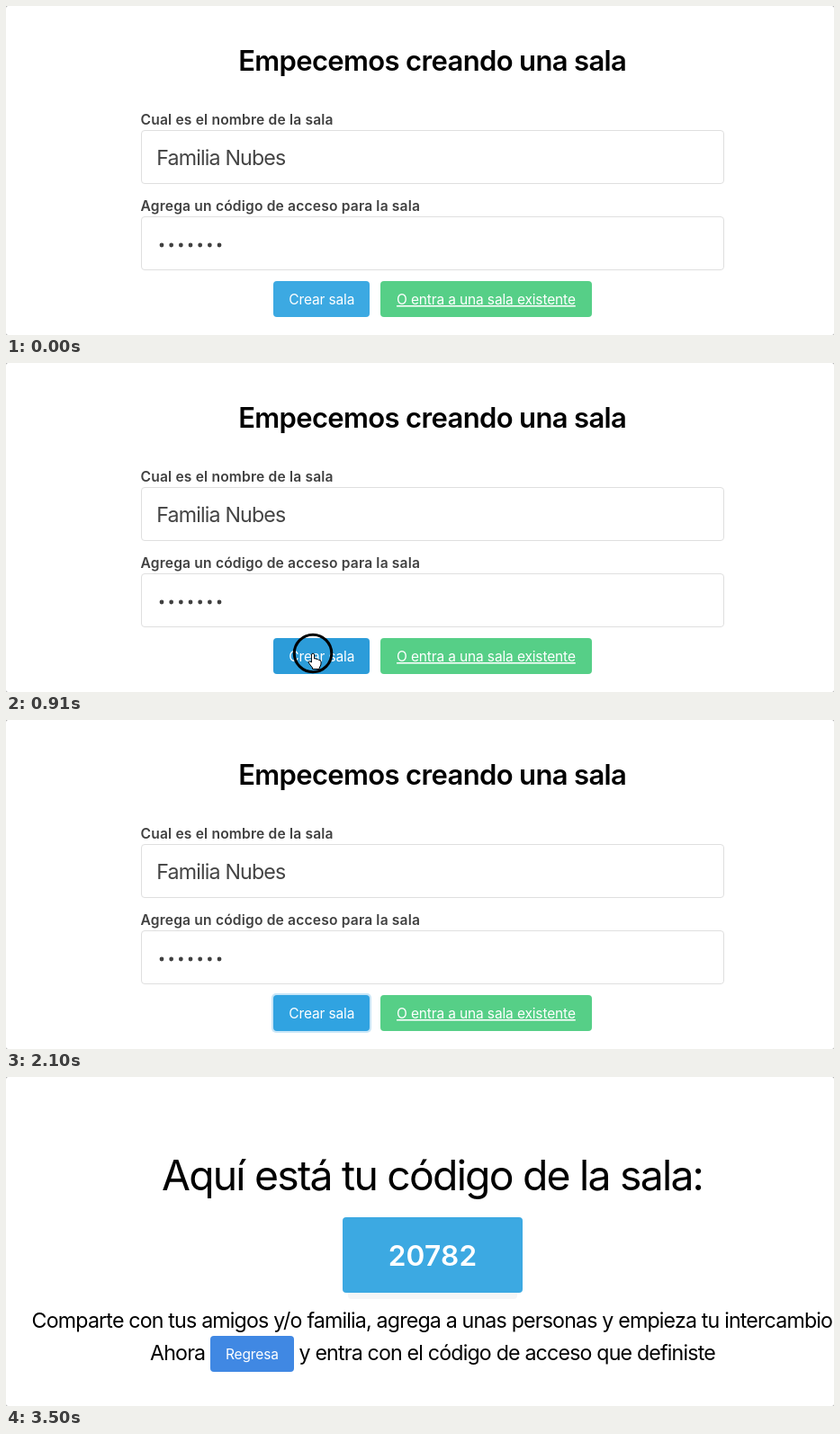
Write an HTML page that moves like this. It is 920 px wide and 366 px high and loops after 3.57 s.

```html
<!DOCTYPE html>
<html lang="es">
<head>
<meta charset="utf-8">
<style>
  html, body { margin: 0; width: 100%; height: 100%; overflow: hidden; background: #fff; }
  svg { display: block; width: 920px; height: 366px; font-family: Inter, "Open Sans", sans-serif; }
  .mid { text-anchor: middle; }
  .heading { font-size: 31px; font-weight: 600; letter-spacing: -.0207em; }
  .label { font-size: 15.6px; font-weight: 600; letter-spacing: .0115em; fill: #404040; }
  .value { font-size: 23.2px; letter-spacing: -.0355em; fill: #444; }
  .button { font-size: 15.5px; letter-spacing: -.009em; fill: #fff; }
  .title { font-size: 46.3px; letter-spacing: -.038em; }
  .code { font-size: 31.6px; font-weight: 600; letter-spacing: .006em; fill: #fff; }
  .body { font-size: 23.2px; letter-spacing: -.0355em; }
  .field { fill: #fff; stroke: #dfdfdf; }
</style>
</head>
<body>
<svg viewBox="0 0 920 366">
  <rect width="920" height="366" fill="#aaa"/>
  <rect width="920" height="366" rx="2.5" fill="#fff"/>

  <g id="form">
    <text class="heading mid" x="473.7" y="72">Empecemos creando una sala</text>
    <text class="label" x="149.5" y="132">Cual es el nombre de la sala</text>
    <rect class="field" x="150.5" y="138.5" width="647" height="59" rx="3.5"/>
    <text class="value" x="167.2" y="177">Familia Nubes</text>
    <text class="label" x="149.5" y="228">Agrega un código de acceso para la sala</text>
    <rect id="halo" x="147" y="231" width="654" height="66" rx="6" fill="#d0dff5"/>
    <rect id="password" class="field" x="150.5" y="234.5" width="647" height="59" rx="3.5"/>
    <g id="dots" fill="#404040"></g>
    <path id="caret" d="M242.5 251V278" stroke="#222"/>
    <rect id="glow" x="295" y="304" width="111" height="44" rx="5" fill="#c9e6f7"/>
    <rect id="create" x="297" y="306" width="107" height="40" rx="4"/>
    <text class="button mid" x="350.8" y="332">Crear sala</text>
    <rect x="416" y="306" width="235" height="40" rx="4" fill="#56cf87"/>
    <text class="button mid" x="533.4" y="332" text-decoration="underline">O entra a una sala existente</text>
    <circle id="ring" fill="none" stroke="#000" stroke-width="3"/>
    <path id="arrow" d="M0 0V14.5L3.4 11.4L5.8 16.5L8.4 15.3L6.1 10.4H10.5Z" fill="#000" stroke="#fff"/>
    <path id="hand" d="M-1.6 1Q0-1 1.6 1V6Q3.2 5 4.2 6.7Q5.8 6 6.6 7.6Q9 7 9 9.5V12Q8.6 14 7.2 16V17.5H-.5V16Q-3 13-5 10Q-4.5 7.6-1.6 10Z" fill="#fff" stroke="#000" stroke-linejoin="round"/>
  </g>

  <g id="result">
    <text class="title mid" x="473.6" y="126">Aquí está tu código de la sala:</text>
    <rect x="380" y="236" width="188" height="11" rx="4" fill="#f5f6f7"/>
    <rect x="374" y="156" width="200" height="84" rx="4" fill="#3ca9e2"/>
    <text class="code mid" x="474" y="210">20782</text>
    <text class="body mid" x="473.4" y="279">Comparte con tus amigos y/o familia, agrega a unas personas y empieza tu intercambio</text>
    <text class="body" x="160" y="315">Ahora</text>
    <rect x="227" y="288" width="93" height="40" rx="4" fill="#4088e3"/>
    <text class="button mid" x="273.4" y="314">Regresa</text>
    <text class="body" x="325.5" y="315">y entra con el código de acceso que definiste</text>
  </g>
</svg>
<script>
const LOOP = 3570, STEP = 70;
const $ = id => document.getElementById(id);
const show = (id, on) => $(id).style.display = on ? '' : 'none';
const set = (id, attrs) => {
  for (const key in attrs) $(id).setAttribute(key, attrs[key]);
};
const clamp = v => Math.max(0, Math.min(1, v));

$('dots').innerHTML = Array.from({ length: 7 }, (_, i) =>
  `<circle cx="${173 + i * 10.67}" cy="266" r="2.4"/>`).join('');

// Pointer stops: time, x, y
const path = [
  [70, 615, 360], [280, 470, 342], [560, 358, 326], [630, 357, 326],
  [700, 341, 323], [1470, 341, 323], [1540, 385, 340], [1610, 414, 350],
  [1750, 414, 350], [1960, 405, 368]
];
const clicks = [560, 840];

function pointer(t) {
  const i = path.findIndex(p => p[0] > t);
  if (i < 1) return path[i < 0 ? path.length - 1 : 0].slice(1);
  const [a, b] = [path[i - 1], path[i]];
  const k = (t - a[0]) / (b[0] - a[0]);
  return [a[1] + (b[1] - a[1]) * k, a[2] + (b[2] - a[2]) * k];
}

function draw(t) {
  const done = t >= 2240;
  show('form', !done);
  show('result', done);
  if (done) return;

  const [x, y] = pointer(t);
  const at = { transform: `translate(${x} ${y})` };
  set('arrow', at);
  set('hand', at);
  const hover = t >= 700, visible = t >= 70 && t < 1960;
  show('arrow', visible && !hover);
  show('hand', visible && hover);

  const age = t - (t < clicks[1] ? clicks[0] : clicks[1]);
  show('ring', age >= 0 && age < 280);
  set('ring', { cx: x, cy: y, r: 12 + 17.5 * clamp(age / 140), opacity: clamp((280 - age) / 140) });

  const focused = t >= 630 && t < 840;
  show('halo', focused);
  show('caret', focused);
  $('password').style.stroke = focused ? '#4d86c4' : '';

  const pressed = t >= 840 && t < 1120;
  set('create', { fill: pressed ? '#2c9cd9' : hover ? '#30a3e1' : '#3ca9e2' });
  set('glow', { opacity: clamp((t - 1120) / 210) });
}

function tick(now) {
  draw(Math.floor(now % LOOP / STEP) * STEP);
  requestAnimationFrame(tick);
}
tick(performance.now());
</script>
</body>
</html>
```
